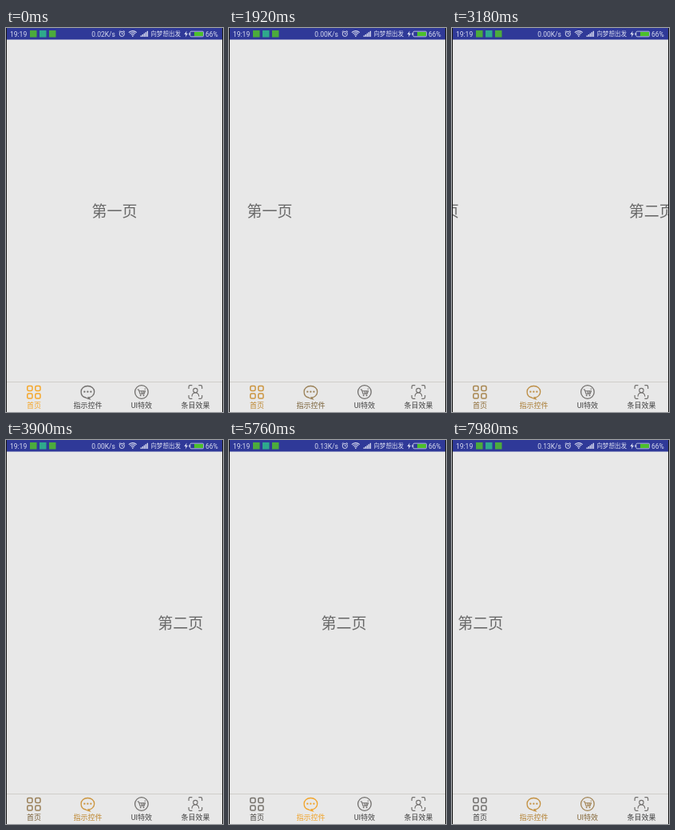
Animation of 272 by 480 pixels, one loop 8 s. Source, as an HTML page with a canvas:

```html
<!DOCTYPE html>
<html lang="zh-CN">
<head>
<meta charset="utf-8">
<title>Tab pager</title>
<style>
html, body { margin: 0; width: 100%; height: 100%; overflow: hidden; background: #e8e8e8; }
canvas { display: block; width: 272px; height: 480px; }
</style>
</head>
<body>
<canvas id="stage"></canvas>
<script>
const W = 272, H = 480, PAGE = 270, LOOP = 8000, STEP = 60;
const FONT = 'Roboto, "Noto Sans CJK SC", "Noto Sans CJK", sans-serif';
const canvas = document.getElementById('stage');
const c = canvas.getContext('2d');
const scale = window.devicePixelRatio || 1;
canvas.width = W * scale;
canvas.height = H * scale;

// Drag path: time, page position, speed in pages per second
const drag = [
  [0, 0, 0.1], [1920, 0.315, 0.2], [3180, 0.577, 0.18], [4680, 0.807, 0.15],
  [5760, 0.97, 0.1], [6240, 1, 0], [6690, 1, 0.1], [7200, 1.167, 0.3], [8000, 1.376, 0.23]
];

function position(t) {
  const i = Math.max(1, drag.findIndex(k => k[0] >= t));
  const [t0, p0, v0] = drag[i - 1], [t1, p1, v1] = drag[i];
  const d = (t1 - t0) / 1000, u = (t - t0) / (t1 - t0), w = 1 - u;
  return p0 * w * w * (1 + 2 * u) + p1 * u * u * (3 - 2 * u)
    + d * u * w * (v0 * w - v1 * u);
}

const GREY = [112, 110, 108], DARK = [66, 66, 66], ORANGE = [245, 166, 40];
const mix = (a, b, k) => `rgb(${a.map((v, i) => Math.round(v + (b[i] - v) * k))})`;

function text(s, x, y, size, color, align = 'center', weight = 400) {
  c.font = `${weight} ${size}px ${FONT}`;
  c.textAlign = align;
  c.fillStyle = color;
  c.fillText(s, x, y);
}

function rect(x, y, w, h, color) {
  c.fillStyle = color;
  c.fillRect(x, y, w, h);
}

function stroke(d, width = 1) {
  c.lineWidth = width;
  c.stroke(new Path2D(d));
}

function dot(x, y, r) {
  c.beginPath();
  c.arc(x, y, r, 0, 7);
  c.fill();
}

function ring(x, y, r, width, from = 0, to = Math.PI * 2) {
  c.lineWidth = width;
  c.beginPath();
  c.arc(x, y, r, from, to);
  c.stroke();
}

// Icons are drawn around their own centre
function gridIcon() {
  c.lineWidth = 1.5;
  for (const x of [-8.1, 1.9])
    for (const y of [-7.5, 2.1]) {
      c.beginPath();
      c.roundRect(x, y, 6.2, 5.9, 1.6);
      c.stroke();
    }
}

function chatIcon() {
  stroke('M-2.5 7C-6 6.3-8.3 3.7-8.3-.3C-8.3-4.6-4.6-7.5 0-7.5C4.6-7.5 8.3-4.6 8.3-.3C8.3 4 4.8 6.8.8 7L2.6 8.8Q0 8.6-2.5 7Z', 1.3);
  for (const x of [-4, 0, 4]) dot(x, -0.3, 1.15);
}

function cartIcon() {
  ring(0, 0, 8.3, 1.3);
  stroke('M-5.3-3H-3.6L-1.9 2.3H3.2L4.6-1.3H-3M0-1.3L.4 2M2.5-1.3L2 2M3.8-3.4L5-4.2', 1.1);
  dot(-1.2, 4.3, 0.95);
  dot(2.6, 4.3, 0.95);
}

function personIcon() {
  stroke('M-8.3-4V-6.5Q-8.3-8.3-6.5-8.3H-4M4-8.3H6.5Q8.3-8.3 8.3-6.5V-4M8.3 4V6.5Q8.3 8.3 6.5 8.3H4M-4 8.3H-6.5Q-8.3 8.3-8.3 6.5V4', 1.2);
  ring(0, -1.9, 2.7, 1.1);
  stroke('M-4.4 5.6C-4.2 2.8-2.6 1-0 1C2.6 1 4.2 2.8 4.4 5.6', 1.1);
}

const tabs = [
  ['首页', gridIcon], ['指示控件', chatIcon], ['UI特效', cartIcon], ['条目效果', personIcon]
];
const pages = ['第一页', '第二页', '第三页', '第四页'];

function tabBar(p) {
  rect(1, 442, PAGE, 1, '#cfcdca');
  tabs.forEach(([label, icon], i) => {
    const k = Math.max(0, 1 - Math.abs(p - i));
    c.save();
    c.translate(34.9 + i * PAGE / 4, 455);
    c.strokeStyle = c.fillStyle = mix(GREY, ORANGE, k);
    icon();
    c.restore();
    text(label, 34.9 + i * PAGE / 4, 474.8, 9, mix(DARK, ORANGE, k));
  });
}

function statusBar(t) {
  const ink = '#d9dcf0';
  const speed = t < 500 ? '0.02' : t < 4300 ? '0.00' : '0.13';
  rect(0, 0, W, 14.5, '#2f3998');
  text('19:19', 5, 10.5, 8.5, ink, 'left');
  ['#4cab3c', '#2fa98c', '#4cab3c'].forEach((color, i) => rect(30 + i * 12, 3, 8.5, 8.5, color));
  text(speed + 'K/s', 137, 10.5, 8.5, ink, 'right');

  c.strokeStyle = c.fillStyle = ink;
  ring(145.3, 7.4, 3.1, 1);
  stroke('M145.3 5.6V7.6H146.8M141.6 4.8L143.4 3.3M149 4.8L147.2 3.3', 0.9);
  for (const r of [2.6, 4.7, 6.8]) ring(158.8, 10.4, r, 1.1, -Math.PI * 0.76, -Math.PI * 0.24);
  dot(158.8, 10.1, 0.9);
  for (let i = 0; i < 5; i++) rect(168.6 + i * 2, 9.4 - i * 1.4, 1.4, 1.6 + i * 1.4, ink);

  text('向梦想出发', 200.2, 10.3, 7.6, ink);
  c.fillStyle = ink;
  c.fill(new Path2D('M226.6 3.6L223.4 8H225.5L224.8 11.4L228 6.8H225.9Z'));
  c.lineWidth = 0.8;
  c.beginPath();
  c.roundRect(230.8, 4.2, 16.8, 6.6, 1.4);
  c.stroke();
  rect(229.4, 6.1, 1.2, 2.8, ink);
  rect(236, 5, 10.9, 5, '#4cc02c');
  text('66%', 250, 10.5, 8.5, ink, 'left');
}

function draw(t) {
  const p = position(t);
  c.setTransform(scale, 0, 0, scale, 0, 0);
  rect(0, 0, W, H, '#e8e8e8');
  pages.forEach((s, i) => text(s, 136 + (i - p) * PAGE, 236, 19, '#696969'));
  tabBar(p);
  statusBar(t);
  rect(0, 0, 1, H, '#151515');
  rect(271, 0, 1, H, '#151515');
}

const start = performance.now();
function frame() {
  const t = (performance.now() - start) % LOOP;
  draw(Math.floor(t / STEP) * STEP);
  requestAnimationFrame(frame);
}
frame();
</script>
</body>
</html>
```
